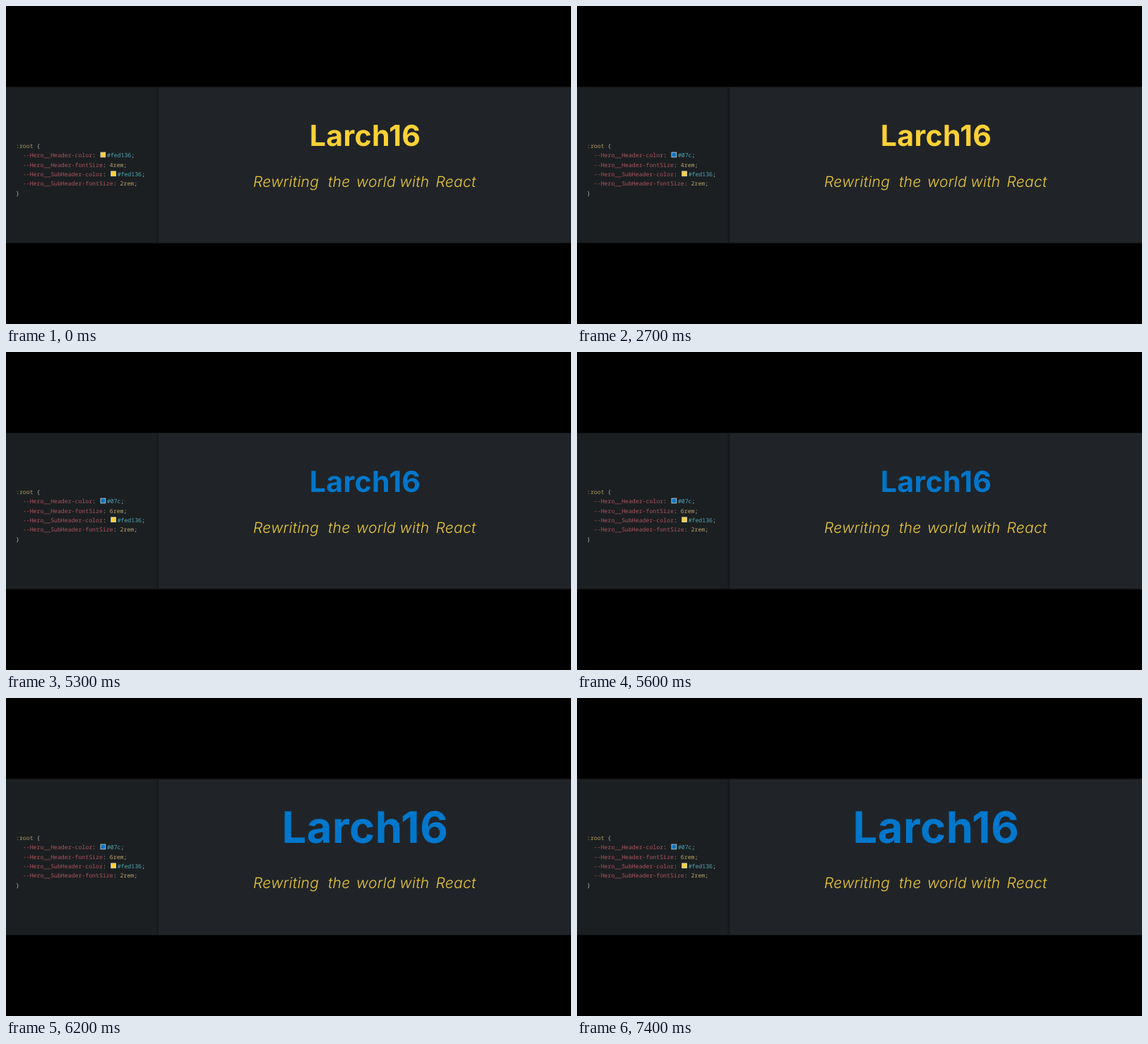
Write an HTML page that moves like this. It is 800 px wide and 450 px high and loops after 8 s.

```html
<!DOCTYPE html>
<html lang="en">
<head>
<meta charset="utf-8">
<title>Live theme editing</title>
<style>
  html, body { margin: 0; width: 100%; height: 100%; overflow: hidden; background: #000; }
  svg { display: block; width: 100vw; height: 100vh; }
  text { text-rendering: geometricPrecision; }
  .code text { font: 8.2px "Noto Sans Mono", "DejaVu Sans Mono", monospace; }
  .title { font-family: Inter, "Open Sans", sans-serif; font-weight: 700; letter-spacing: .008em; text-anchor: middle; }
  .sub { font: italic 300 21px Inter, "Open Sans", sans-serif; letter-spacing: .3px; fill: #ecc83b; }
  .sel { fill: #b39d5c; }
  .prop { fill: #b05460; }
  .num { fill: #bda469; }
  .hex { fill: #4fa9b8; }
  .punc { fill: #b0b4b6; }
</style>
</head>
<body>
<svg viewBox="0 0 800 450">
  <defs>
    <linearGradient id="edge">
      <stop offset="0" stop-color="#14181a" stop-opacity="0"/>
      <stop offset=".6" stop-color="#14181a"/>
      <stop offset="1" stop-color="#14181a" stop-opacity="0"/>
    </linearGradient>
  </defs>
  <rect width="800" height="450" fill="#000"/>
  <rect y="114.5" width="216" height="221" fill="#1b1f21"/>
  <rect x="216" y="114.5" width="584" height="221" fill="#202428"/>
  <rect x="212" y="114.5" width="5" height="221" fill="url(#edge)"/>
  <g class="code" id="code"></g>
  <text class="title" id="title" x="508.5"></text>
  <text class="sub" id="sub"></text>
</svg>
<script>
const LOOP = 8000;
const LEFT = 14, ADVANCE = 4.92, TOP = 200.8, PITCH = 13.4, CHIP = 10.8;
const YELLOW = '#fed136', BLUE = '#0077cc';

// [time, changed values]
const steps = [
  [0, { hex: '#fed136', chip: YELLOW, size: '4', color: YELLOW, big: false }],
  [1300, { hex: '' }],
  [1600, { chip: '' }],
  [1700, { hex: '#' }],
  [1900, { hex: '#0' }],
  [2000, { hex: '#07' }],
  [2200, { hex: '#07c' }],
  [2400, { chip: BLUE }],
  [2900, { color: BLUE }],
  [5300, { size: '6' }],
  [6200, { big: true }]
];

const code = document.getElementById('code');
const title = document.getElementById('title');
const sub = document.getElementById('sub');

function add(parent, tag, attrs, content = '') {
  const el = document.createElementNS('http://www.w3.org/2000/svg', tag);
  for (const key in attrs) el.setAttribute(key, attrs[key]);
  el.textContent = content;
  parent.append(el);
  return el;
}

const colX = col => LEFT + col * ADVANCE;
const rowY = row => TOP + row * PITCH;

function run(row, col, cls, content) {
  return add(code, 'text', { x: colX(col), y: rowY(row), class: cls }, content);
}

function prop(row, name) {
  run(row, 2, 'prop', name);
  run(row, 2 + name.length, 'punc', ':');
  return name.length + 4;
}

function colorValue(row, col) {
  const chip = add(code, 'rect', {
    x: colX(col) + 1.9, y: rowY(row) - 7.1, width: 6.8, height: 6.8,
    stroke: '#d5d8cf', 'stroke-width': .8
  });
  const hex = run(row, col, 'hex', '');
  const end = run(row, col, 'punc', ';');
  return (value, fill) => {
    const x = colX(col) + (fill ? CHIP : 0);
    chip.setAttribute('visibility', fill ? 'visible' : 'hidden');
    chip.setAttribute('fill', fill || 'none');
    hex.setAttribute('x', x);
    hex.textContent = value;
    end.setAttribute('x', x + value.length * ADVANCE);
  };
}

function remValue(row, col, n) {
  const el = run(row, col, 'num', n + 'rem');
  run(row, col + 4, 'punc', ';');
  return el;
}

run(0, 0, 'sel', ':root');
run(0, 6, 'punc', '{');
const setHeader = colorValue(1, prop(1, '--Hero__Header-color'));
const headerSize = remValue(2, prop(2, '--Hero__Header-fontSize'), 4);
colorValue(3, prop(3, '--Hero__SubHeader-color'))('#fed136', YELLOW);
remValue(4, prop(4, '--Hero__SubHeader-fontSize'), 2);
run(5, 0, 'punc', '}');

title.textContent = 'Larch16';
const words = [['Rewriting', 350], ['the', 456], ['world', 496], ['with', 557.5], ['React', 608.5]];
const tspans = words.map(([word, x]) => add(sub, 'tspan', { x }, word));

function draw(t) {
  const s = {};
  for (const [at, change] of steps) if (t >= at) Object.assign(s, change);
  setHeader(s.hex, s.chip);
  headerSize.textContent = s.size + 'rem';
  title.setAttribute('fill', s.color);
  title.setAttribute('font-size', s.big ? 61.5 : 41);
  title.setAttribute('y', s.big ? 205.3 : 197.8);
  for (const el of tspans) el.setAttribute('y', s.big ? 269.1 : 256.3);
}

const start = performance.now();
function tick() {
  draw((performance.now() - start) % LOOP);
  requestAnimationFrame(tick);
}
tick();
</script>
</body>
</html>
```
